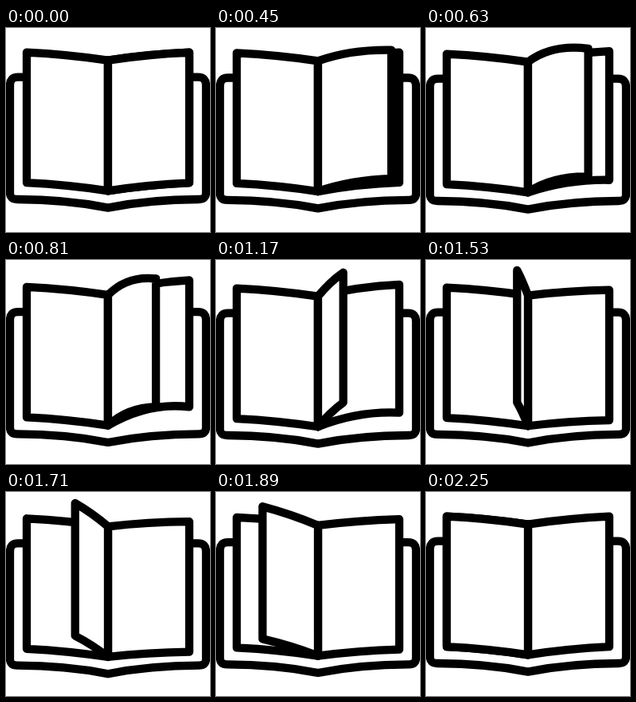
These frames come from a looping animation (256x256 px, 2520 ms). An HTML page:

```html
<!DOCTYPE html>
<html lang="en">
<head>
<meta charset="utf-8">
<title>Turning page</title>
<style>
  html, body { margin: 0; width: 100%; height: 100%; overflow: hidden; background: #fff; }
  svg { display: block; width: 100vw; height: 100vh; }
  path { fill: #fff; stroke: #000; stroke-width: 10.3; stroke-linejoin: round; }
</style>
</head>
<body>
<svg viewBox="0 0 256 256">
  <g id="book">
    <path d="M26 61.7H15Q5 61.7 5 72V207Q5 215 14 215Q75 215 128 225.6Q181 215 242 215Q251 215 251 207V72Q251 61.7 241 61.7H230"/>
    <path id="left"/>
    <path id="right"/>
    <path id="turning"/>
  </g>
</svg>
<script>
const LOOP = 2520, HOLD = 270, STEP = 90, LAST = 23;
const SPINE_X = 128, SPINE_TOP = 40.6, SPINE_BOTTOM = 204.3;
const WIDTH = 102, TOP = 30.6, HEIGHT = 163.5, BULGE = 2.5;

const bump = (k, center) => Math.exp(-(((k - center) / 3.2) ** 2));

// Page from the spine to its free edge; bulges lift the middle of each curved side.
function drawPage(id, { x, top = TOP, height = HEIGHT, bend = 0.49, upper = BULGE, lower = BULGE }) {
  const bottom = top + height;
  const cx = SPINE_X + (x - SPINE_X) * bend;
  const upperY = (SPINE_TOP + top) / 2 - upper;
  const lowerY = (SPINE_BOTTOM + bottom) / 2 - lower;
  document.getElementById(id).setAttribute("d",
    `M${SPINE_X} ${SPINE_TOP}Q${cx} ${upperY} ${x} ${top}V${bottom}` +
    `Q${cx} ${lowerY} ${SPINE_X} ${SPINE_BOTTOM}Z`);
}

// The next page is pulled up by the turning one, then settles.
function drawRight(k) {
  const pull = bump(k, 8.3), settle = bump(k, 16.5);
  drawPage("right", {
    x: SPINE_X + WIDTH,
    top: TOP - 10 * pull + 4 * settle,
    height: HEIGHT - 5.5 * pull,
    upper: BULGE + 5 * pull,
    lower: BULGE + 18 * pull
  });
}

// The page curls at first, slows past the middle, then falls to the left.
function drawTurning(k) {
  const u = k / LAST, curl = bump(k, 6);
  const progress = u - 0.11 * Math.sin(Math.PI * u ** 1.8) + 0.055 * curl * (1 - u);
  const angle = Math.PI * Math.min(1, progress);
  const rise = 22 * Math.abs(Math.sin(angle)) ** 1.5 - 6 * curl;
  drawPage("turning", {
    x: SPINE_X + WIDTH * Math.cos(angle),
    top: TOP - rise,
    height: HEIGHT - 3 * Math.sin(2 * Math.PI * u),
    bend: 0.49 - 0.1 * curl,
    upper: BULGE + 13 * curl,
    lower: BULGE + 9 * curl
  });
}

function render(now) {
  const t = now % LOOP;
  const k = t < HOLD ? 0 : Math.min(LAST, Math.floor((t - HOLD) / STEP) + 1);
  const dip = 5 * Math.sin(Math.PI * k / LAST) ** 2;
  document.getElementById("book").setAttribute("transform", `translate(0 ${dip})`);
  drawRight(k);
  drawTurning(k);
}

drawPage("left", { x: SPINE_X - WIDTH });
const start = performance.now();
function tick() {
  render(performance.now() - start);
  requestAnimationFrame(tick);
}
tick();
</script>
</body>
</html>
```
